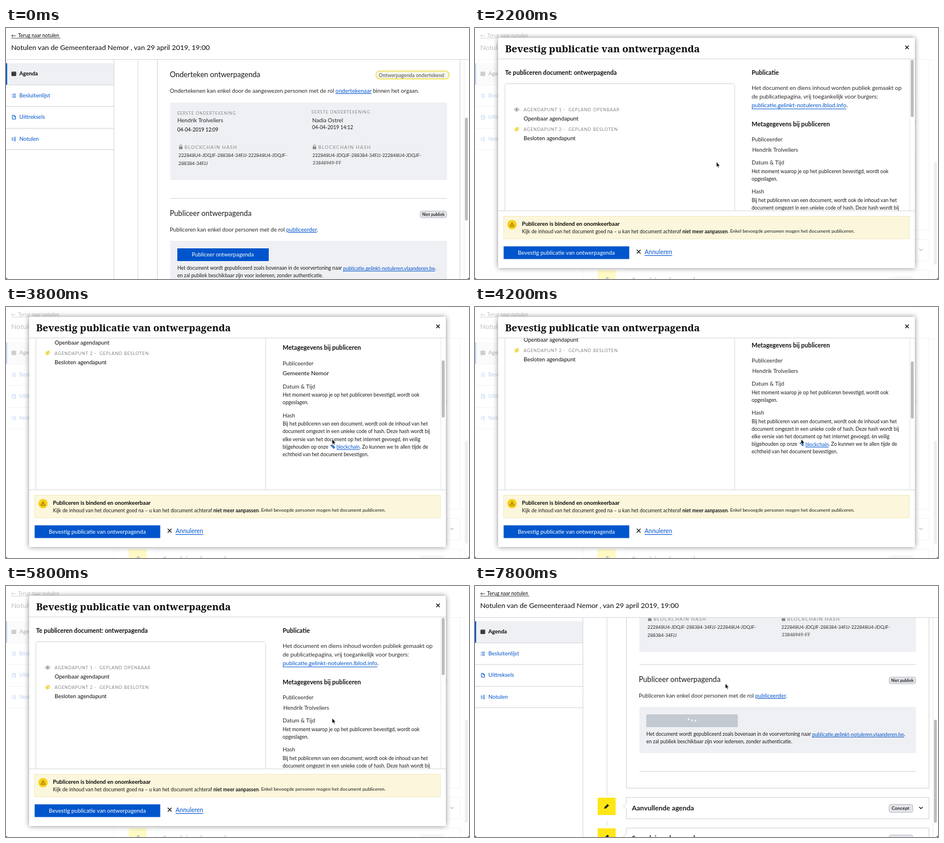
These frames come from a looping animation (800x434 px, 8 s). An HTML page:

```html
<!DOCTYPE html>
<html lang="nl">
<head>
<meta charset="utf-8">
<title>Publiceer ontwerpagenda</title>
<style>
  html, body { margin: 0; width: 100%; height: 100%; overflow: hidden; background: #222; }
  svg { display: block; width: 100vw; height: 100vh; }
  text { font: 9.75px Lato, sans-serif; fill: #2a2a2a; dominant-baseline: central; white-space: pre; transform: translateY(-.6px); }
  .small { font-size: 8.65px; fill: #1a1a1a; }
  .para { font-size: 10px; }
  .nav { font-size: 9.5px; fill: #0055cc; }
  .h2 { font-size: 12.65px; fill: #1a1a1a; }
  .h3 { font-size: 10.65px; font-weight: 700; fill: #111; }
  .card { font-size: 11.95px; font-weight: 700; fill: #1a1a1a; }
  .value { font-size: 9.7px; }
  .label { font-size: 7px; letter-spacing: .8px; fill: #888; }
  .hashLabel { font-size: 8px; letter-spacing: 1.1px; fill: #888; }
  .item { font-size: 7.55px; letter-spacing: .7px; fill: #858585; }
  .hash { font-size: 8px; }
  .dark { fill: #0a0a0a; }
  .bold { font-weight: 700; }
  .link { fill: #0055cc; text-decoration: underline; }
  .white { fill: #fff; }
  .panel { fill: #eff0f4; }
  .badge { fill: #e3e4e9; stroke: #b9bec6; }
  .box { fill: #fff; stroke: #cfd3d8; }
  .line { stroke: #d3d6da; fill: none; }
  .yellow { fill: #ffe615; }
  .icon { fill: none; stroke: #0055cc; }
</style>
</head>
<body>
<svg viewBox="0 0 800 434" preserveAspectRatio="none">
  <defs>
    <clipPath id="windowClip"><path d="M0 0H800V430Q800 434 796 434H4Q0 434 0 430Z"/></clipPath>
    <clipPath id="pageClip"><rect x="187" y="54" width="613" height="380"/></clipPath>
    <clipPath id="bodyClip"><rect x="41" y="54" width="718" height="262"/></clipPath>
    <filter id="glow" x="-10%" y="-10%" width="120%" height="120%">
      <feDropShadow dx="0" dy="0" stdDeviation="5" flood-opacity=".45"/>
    </filter>
    <filter id="soft" x="-5%" y="-5%" width="110%" height="110%">
      <feDropShadow dx="0" dy="0" stdDeviation="1.4" flood-opacity=".35"/>
    </filter>
    <g id="lock"><rect y="3" width="6" height="4.5" rx=".6" fill="#888"/><path d="M1.2 3V1.8a1.8 1.8 0 0 1 3.6 0V3" fill="none" stroke="#888"/></g>
    <g id="eye"><path d="M-4.5 0Q0-5.5 4.5 0Q0 5.5-4.5 0Z" fill="none" stroke="currentColor"/><circle r="1.8" fill="currentColor"/></g>
    <g id="agendaCard">
      <rect class="yellow" x="212" y="1" width="31" height="30"/>
      <path d="M223 20L224 17L229 12L231.500 14.500L226.500 19.500Z" fill="#222"/>
      <path class="box" d="M261.500.5H784.500V37.500H261.500V20L256.500 15L261.500 10Z"/>
      <rect class="badge" x="715.500" y="12.500" width="41" height="14" rx="3"/>
      <text class="bold" x="720" y="20" style="font-size:8.2px">Concept</text>
      <path d="M767.500 17L770.500 20L773.500 17" fill="none" stroke="#222" stroke-width="1.400"/>
    </g>
  </defs>

  <g clip-path="url(#windowClip)">
    <rect width="800" height="434" fill="#fff"/>

    <g clip-path="url(#pageClip)">
      <g id="page">
        <path class="line" d="M228 0V521M228 565V573"/>
        <rect class="box" x="261.500" y="-20" width="523" height="528.500"/>
        <path class="line" d="M284 54.500H762M284 294.500H762M284 479.500H762"/>

        <text class="h2" x="283" y="81">Onderteken ontwerpagenda</text>
        <rect x="639.500" y="74.500" width="126" height="13.500" rx="6" fill="#f6f6ee" stroke="#f1e36a" stroke-width="2"/>
        <text class="bold" x="644" y="82" style="font-size:8.65px;fill:#777">Ontwerpagenda ondertekend</text>
        <text x="283" y="108.500">Ondertekenen kan enkel door de aangewezen personen met de rol <tspan class="link">ondertekenaar</tspan> binnen het orgaan.</text>

        <g id="signatures">
          <rect class="panel" x="284" y="129" width="478" height="134"/>
          <text class="label" x="296" y="148">EERSTE ONDERTEKENING</text>
          <text class="value" x="296" y="160">Hendrik Trolveliers</text>
          <text class="small dark" x="296" y="176">04-04-2019 12:09</text>
          <text class="label" x="528" y="146">EERSTE ONDERTEKENING</text>
          <text class="value" x="529" y="159.500">Nadia Ostrel</text>
          <text class="small" x="529" y="172.500">04-04-2019 14:12</text>
          <use href="#lock" x="299" y="202"/>
          <text class="hashLabel" x="308.500" y="207">BLOCKCHAIN HASH</text>
          <text class="hash" x="298" y="220.500">222848U4-JDQJF-288384-34FJJ-222848U4-JDQJF-</text>
          <text class="hash" x="298" y="234.500">288384-34FJJ</text>
          <use href="#lock" x="530" y="202"/>
          <text class="hashLabel" x="539.500" y="207">BLOCKCHAIN HASH</text>
          <text class="hash" x="529.500" y="220.500">222848U4-JDQJF-288384-34FJJ-222848U4-JDQJF-</text>
          <text class="hash bold" x="530" y="234" style="fill:#666">23848949-FF</text>
        </g>

        <text class="h2" x="283" y="321">Publiceer ontwerpagenda</text>
        <rect class="badge" x="715.500" y="316.500" width="46" height="11.500" rx="3"/>
        <text class="bold" x="719" y="323" style="font-size:7.15px">Niet publiek</text>
        <text x="283" y="348.500">Publiceren kan enkel door personen met de rol <tspan class="link">publiceerder</tspan>.</text>
        <rect class="panel" x="284" y="368" width="478" height="80"/>
        <rect id="publish" x="296" y="381" width="158" height="22"/>
        <text id="publishText" class="white" x="321" y="392.500" style="font-size:9.6px">Publiceer ontwerpagenda</text>
        <g id="loader" class="white"><circle cx="369" r="1.500"/><circle cx="375" r="1.500"/><circle cx="381" r="1.500"/></g>
        <text class="small" x="296" y="415.500">Het document wordt gepubliceerd zoals bovenaan in de voorvertoning naar <tspan class="link">publicatie.gelinkt-notuleren.vlaanderen.be</tspan>,</text>
        <text class="small" x="296" y="428.500">en zal publiek beschikbaar zijn voor iedereen, zonder authenticatie.</text>

        <use href="#agendaCard" y="524"/>
        <text class="card" x="271" y="543">Aanvullende agenda</text>
        <use href="#agendaCard" y="577"/>
        <text class="card" x="271" y="595.500">Spoedeisende agenda</text>
      </g>
      <path d="M791.500 54V434" stroke="#ececec"/>
      <rect id="pageThumb" x="793" width="5" height="178" rx="2.500" fill="#bcbcbc"/>
    </g>

    <path class="line" d="M0 54.500H800M186.500 54V434M0 98.500H186M0 135.500H186M0 173.500H186M0 210.500H186"/>
    <text class="small dark" x="9" y="13.500">←</text>
    <text class="small dark" x="21" y="13.500">Terug naar notulen</text>
    <path d="M9 17.500H94" stroke="#222" stroke-width=".7"/>
    <text class="dark" x="9" y="34.500" style="font-size:12.2px">Notulen van de Gemeenteraad Nemor , van 29 april 2019, 19:00</text>
    <rect class="panel" y="61" width="186" height="37"/>
    <rect y="61" width="2" height="37" fill="#0055cc"/>
    <path d="M10 76H17V82.500H10ZM10 78.500H17M10 80.500H17" fill="#555" stroke="#222"/>
    <text class="nav bold dark" x="23" y="79.500">Agenda</text>
    <path class="icon" d="M10 114.500H11M12 114.500H17M10 117H11M12 117H17M10 119.500H11M12 119.500H17"/>
    <text class="nav" x="23" y="117">Besluitenlijst</text>
    <path class="icon" d="M11 151H14.500L16.500 153V157.500H11ZM14 151V153.500H16.500"/>
    <text class="nav" x="23" y="154.500">Uittreksels</text>
    <path class="icon" d="M10 190H12.500M10 192H12.500M10 194H12.500M14 189H17M13.500 191H17M13.500 193H17M13.500 195H17" stroke-width=".9"/>
    <text class="nav" x="23" y="192">Notulen</text>

    <g id="modal">
      <rect width="800" height="434" fill="#fff" opacity=".75"/>
      <rect x="40" y="17" width="720" height="398" fill="#fff" filter="url(#glow)"/>
      <text class="dark" x="52" y="36.500" style="font:700 16.9px 'Noto Serif',serif">Bevestig publicatie van ontwerpagenda</text>
      <path d="M743.500 30.500L749.500 36.500M749.500 30.500L743.500 36.500" stroke="#111" stroke-width="1.400"/>

      <g clip-path="url(#bodyClip)">
        <g id="body">
          <text class="h3" x="52" y="77.500">Te publiceren document: ontwerpagenda</text>
          <rect x="52.500" y="97" width="395" height="400" fill="#fff" filter="url(#soft)"/>
          <use href="#eye" x="72" y="141" color="#8a8a8a"/>
          <text class="item" x="84" y="142.500">AGENDAPUNT 1 -  GEPLAND OPENBAAR</text>
          <text class="value dark" x="84" y="157">Openbaar agendapunt</text>
          <use href="#eye" x="72" y="175" color="#e8cf1c"/>
          <path d="M69.500 179L75 171" stroke="#e8cf1c" stroke-width="1.300"/>
          <text class="item" x="84" y="176.500">AGENDAPUNT 2 -  GEPLAND BESLOTEN</text>
          <text class="value dark" x="84" y="191">Besloten agendapunt</text>

          <text class="h3" x="478" y="77.500">Publicatie</text>
          <text class="para" x="478" y="104">Het document en diens inhoud worden publiek gemaakt op</text>
          <text class="para" x="478" y="119">de publicatiepagina, vrij toegankelijk voor burgers:</text>
          <text class="para" x="478" y="134"><tspan class="link">publicatie.gelinkt-notuleren.lblod.info</tspan>.</text>
          <text class="h3" x="478" y="166">Metagegevens bij publiceren</text>
          <text class="value" x="478" y="193">Publiceerder</text>
          <text id="person" class="value" x="479" y="210.500">Hendrik Trolveliers</text>
          <text id="council" class="dark" x="478" y="210" style="font-size:10.2px">Gemeente Nemor</text>
          <text class="value" x="478" y="233">Datum &amp; Tijd</text>
          <text class="small" x="478" y="248">Het moment waarop je op het publiceren bevestigd, wordt ook</text>
          <text class="small" x="478" y="261">opgeslagen.</text>
          <text class="value" x="478" y="283">Hash</text>
          <text class="small" x="478" y="298">Bij het publiceren van een document, wordt ook de inhoud van het</text>
          <text class="small" x="478" y="311">document omgezet in een unieke code of hash. Deze hash wordt bij</text>
          <text class="small" x="478" y="324.500">elke versie van het document op het internet gevoegd, èn veilig</text>
          <text class="small" x="478" y="337.500">bijgehouden op onze</text>
          <path class="icon" d="M561.500 335.500l2-1.500 2 2-1.500 1.500zM564.500 338l1.500-1.500 2 2-1.500 1.500z" stroke-width="1.200"/>
          <text class="small" x="571" y="337.500"><tspan class="link">blockchain</tspan>. Zo kunnen we te allen tijde de</text>
          <text class="small" x="478" y="350.500">echtheid van het document bevestigen.</text>
        </g>
        <path d="M751.500 54V316" stroke="#e6e6e6"/>
        <rect id="bodyThumb" x="753" width="5" height="99" rx="2.500" fill="#bcbcbc"/>
      </g>
      <path class="line" d="M40 53.500H760M40 316H760"/>

      <rect x="49.500" y="325.500" width="701" height="39" fill="#fcf7dc" stroke="#f1eabf"/>
      <circle cx="64" cy="340" r="8" fill="#f8cf16"/>
      <path d="M64 336.500L67.800 343H60.200ZM64 338.500V341M64 341.500V342.200" fill="none" stroke="#7a5c00" stroke-width=".9"/>
      <text class="bold dark" x="81" y="338.500" style="font-size:9.64px">Publiceren is bindend en onomkeerbaar</text>
      <text class="small" x="81" y="352">Kijk de inhoud van het document goed na – u kan het document achteraf <tspan class="bold">niet meer aanpassen</tspan><tspan style="font-size:8.3px">. Enkel bevoegde personen mogen het document publiceren.</tspan></text>
      <rect id="confirm" x="49.500" y="377.500" width="217" height="22"/>
      <text class="white" x="74" y="389">Bevestig publicatie van ontwerpagenda</text>
      <path d="M279.500 383.500L286 390M286 383.500L279.500 390" stroke="#111" stroke-width="1.200"/>
      <text class="link" x="293" y="387.500" style="font-size:10.5px">Annuleren</text>
    </g>

    <g id="pointer" stroke-linejoin="round">
      <path id="arrow" d="M0 0V9L2 7.200L3.400 10.400L4.800 9.800L3.500 6.700H6.200Z" fill="#000" stroke="#fff" stroke-width=".7"/>
      <path id="hand" d="M-1 0Q0-1 1 0V3.500L4.500 4.500Q5.500 5 5 7L4 10H-1L-4 6Q-4 4.500-2.500 5L-1 6.500Z" fill="#fff" stroke="#000" stroke-width=".9"/>
      <path id="beam" d="M-2-5Q0-5 0-3.500V3.500Q0 5-2 5M2-5Q0-5 0-3.500M0 3.500Q0 5 2 5M-1 1.500H1" fill="none" stroke="#111"/>
    </g>
  </g>
</svg>

<script>
const LOOP = 8000, STEP = 200;
const $ = id => document.getElementById(id);
const show = (id, on) => $(id).setAttribute("visibility", on ? "inherit" : "hidden");
const move = (id, x, y) => $(id).setAttribute("transform", `translate(${x} ${y})`);

// Keys are [time, value]; eased between neighbours, held outside.
function track(t, keys) {
  const next = keys.findIndex(key => key[0] > t);
  if (next === 0) return keys[0][1];
  if (next < 0) return keys[keys.length - 1][1];
  const [t0, a] = keys[next - 1], [t1, b] = keys[next];
  const p = (t - t0) / (t1 - t0);
  return a + (b - a) * p * p * (3 - 2 * p);
}

const pageScroll = [[100, 0], [700, 159]];
const bodyScroll = [[3100, 0], [3900, 100], [4500, 100], [5000, 62], [5500, 0]];
const modalFade = [[1800, 0], [2200, 1], [7250, 1], [7550, 0]];
const pointerX = [[800, 553], [1500, 390], [2000, 390], [2800, 563.5], [5800, 563.5], [6700, 220], [7300, 220], [7800, 432.5]];
const pointerY = [[800, 236], [1500, 232], [2000, 232], [2800, 228.5], [5800, 228.5], [6700, 392], [7300, 392], [7800, 168.5]];

function draw(t) {
  const scroll = track(t, pageScroll);
  move("page", 0, -scroll);
  move("signatures", 0, scroll > 0 ? 10 : 0);
  move("pageThumb", 0, 155 + scroll * .48);

  const loading = t >= 7400;
  $("publish").setAttribute("fill", loading ? "#c2c9d0" : "#0055cc");
  show("publishText", !loading);
  show("loader", loading);
  [...$("loader").children].forEach((dot, i) =>
    dot.setAttribute("cy", 390.5 + 1.6 * Math.cos((t - 7800) / 160 + 2.4 - i * 1.1)));

  const fade = track(t, modalFade);
  $("modal").setAttribute("opacity", fade);
  show("modal", fade > 0);

  const inner = track(t, bodyScroll);
  const resting = inner === 0 || inner === 100;
  move("body", 0, -inner);
  move("bodyThumb", 0, 55 + inner * .39);
  show("person", resting);
  show("council", !resting);

  const onConfirm = t >= 6600 && t < 7400;
  const onPublish = t >= 1400 && t < 2000;
  const onText = t >= 4600 && t < 5800;
  $("confirm").setAttribute("fill", onConfirm ? "#2a76d2" : "#0055cc");
  move("pointer", track(t, pointerX), track(t, pointerY));
  show("pointer", t >= 600);
  show("hand", onConfirm || onPublish);
  show("beam", onText);
  show("arrow", !(onConfirm || onPublish || onText));
}

function tick(now) {
  draw(Math.floor((now % LOOP) / STEP) * STEP);
  requestAnimationFrame(tick);
}
draw(0);
requestAnimationFrame(tick);
</script>
</body>
</html>
```
